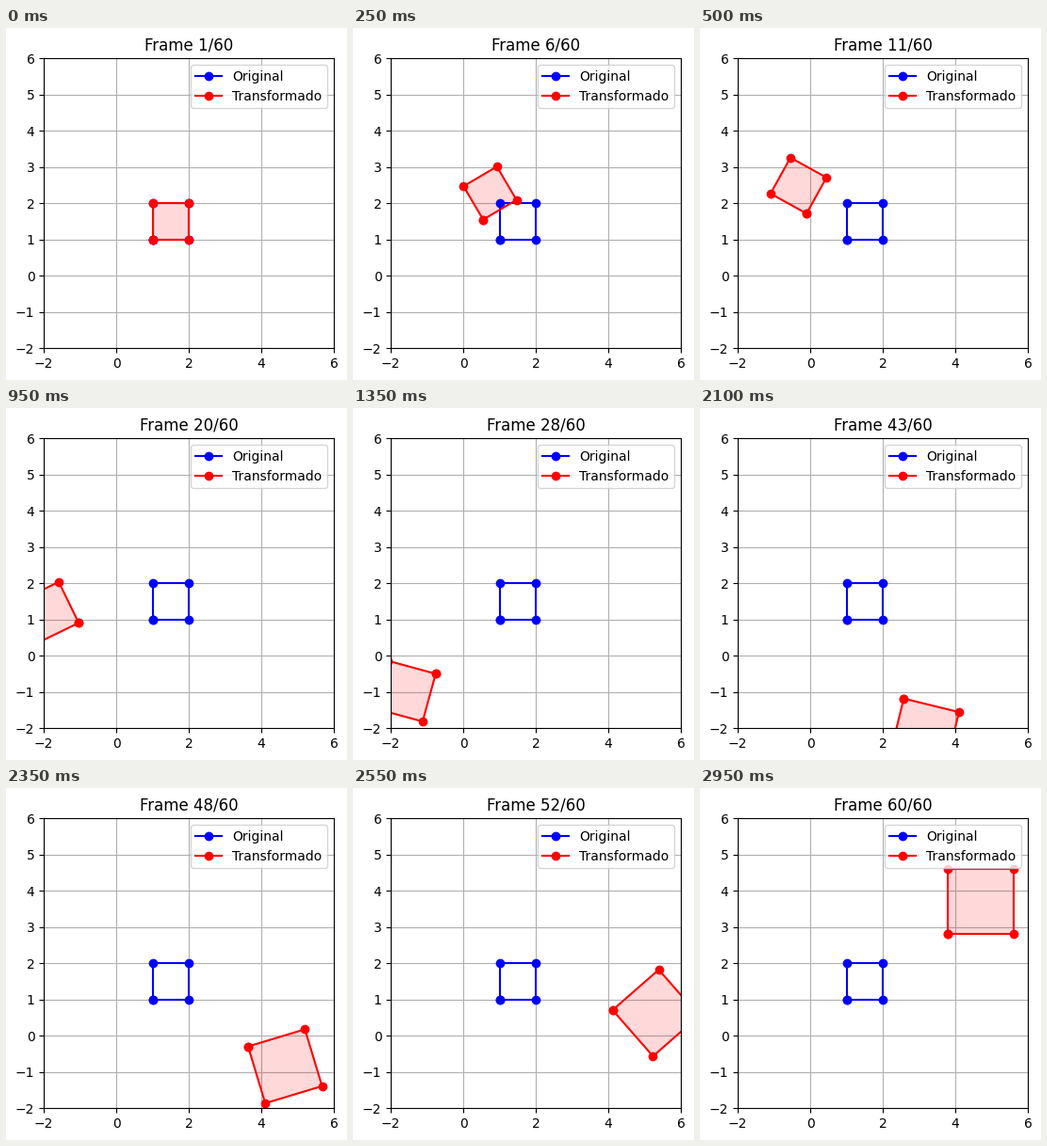
A matplotlib script that plays this animation: 362 by 374 pixels, repeating every 3 s.

```python
import numpy as np
import matplotlib.pyplot as plt
from matplotlib.animation import FuncAnimation

W, H, DPI = 362, 374, 100
FRAMES, INTERVAL = 60, 50
SCALE_GAIN = 0.8
SHIFT = np.array([[2.0], [1.0]])
SQUARE = np.array([[1, 2, 2, 1, 1], [1, 1, 2, 2, 1]], dtype=float)

plt.rcParams["font.family"] = "DejaVu Sans"


def transform(t):
    """Scale, rotate about the origin, then translate."""
    a = 2 * np.pi * t
    rot = np.array([[np.cos(a), -np.sin(a)], [np.sin(a), np.cos(a)]])
    return (1 + SCALE_GAIN * t) * rot @ SQUARE + SHIFT * t


fig = plt.figure(figsize=(W / DPI, H / DPI), dpi=DPI, facecolor="white")
ax = fig.add_axes([40.1 / W, 33.9 / H, 308 / W, 308 / H])
ax.set(xlim=(-2, 6), ylim=(-2, 6), xticks=range(-2, 7, 2), yticks=range(-2, 7))
ax.grid(True)

ax.plot(*SQUARE, "bo-", label="Original")
outline, = ax.plot(*SQUARE, "ro-", label="Transformado")
area, = ax.fill(*SQUARE, facecolor="red", edgecolor="none", alpha=0.15, zorder=1.8)
ax.legend(loc="upper right")
title = ax.set_title("")


def update(i):
    pts = transform(i / (FRAMES - 1))
    outline.set_data(*pts)
    area.set_xy(pts.T)
    title.set_text(f"Frame {i + 1}/{FRAMES}")
    return outline, area, title


anim = FuncAnimation(fig, update, frames=FRAMES, interval=INTERVAL,
                     repeat=True, repeat_delay=0, blit=False)
plt.show()
```
